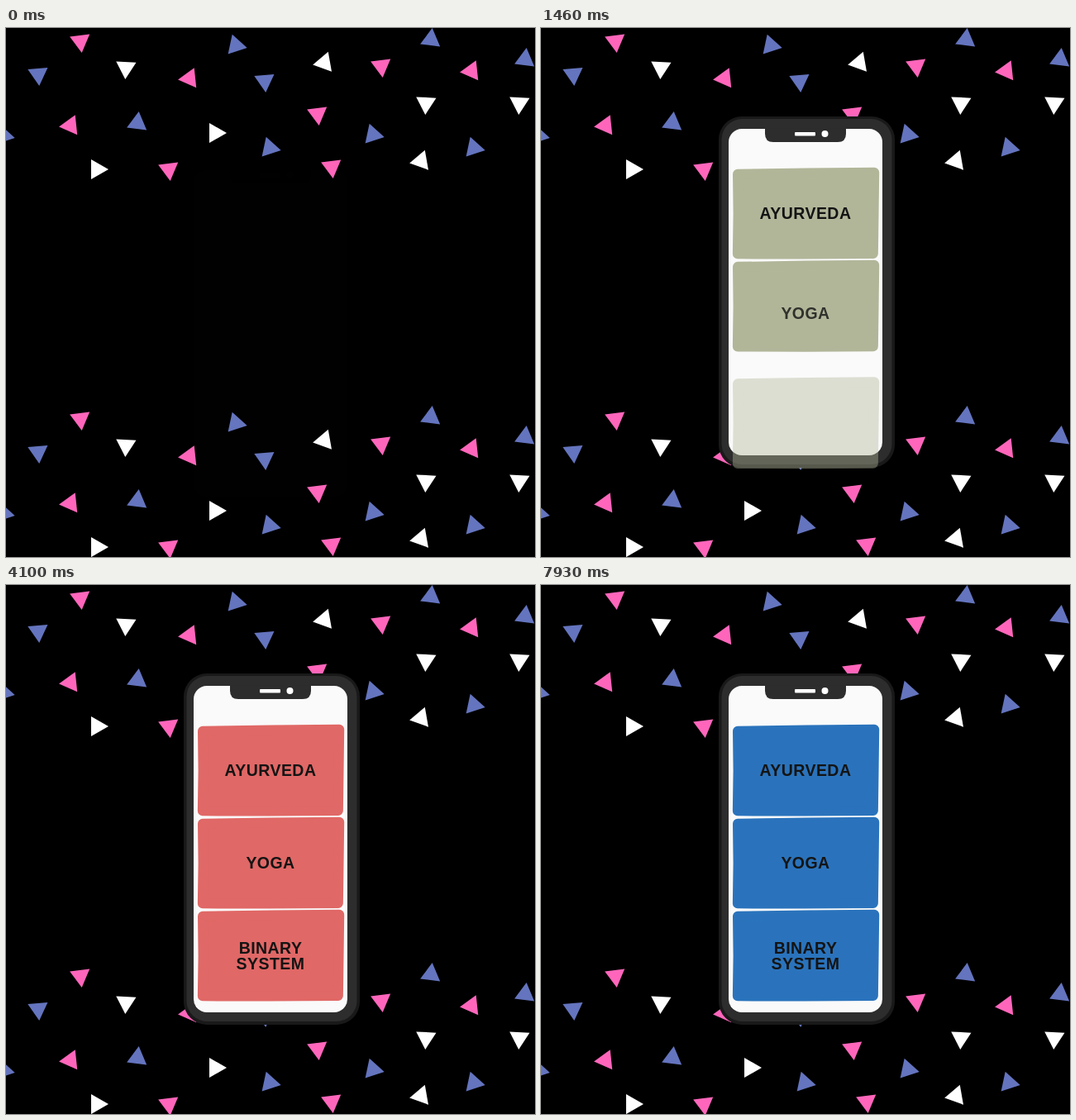
Write an HTML page that moves like this. It is 640 px wide and 640 px high and loops after 7.99 s.

```html
<!DOCTYPE html>
<html lang="en">
<head>
<meta charset="utf-8">
<title>Phone menu</title>
<style>
  html, body { margin: 0; width: 100%; height: 100%; overflow: hidden; background: #000; }
  svg { display: block; width: 100%; height: 100%; }
  text { font: bold 19.5px "Liberation Sans", Arial, sans-serif; letter-spacing: .45px; text-anchor: middle; fill: #141414; }
</style>
</head>
<body>
<svg viewBox="0 0 640 640">
  <rect width="640" height="640"/>
  <g id="confetti"></g>
  <g id="phone">
    <rect x="215" y="107" width="213" height="425" rx="28" fill="#191919"/>
    <rect x="218.5" y="110" width="206" height="418" rx="25" fill="#2d2d2d"/>
    <rect x="227" y="122" width="186" height="395" rx="16" fill="#fafafa"/>
    <path d="M271 121.5H369V128Q369 138 359 138H281Q271 138 271 128Z" fill="#2d2d2d"/>
    <rect x="307" y="126" width="25" height="4.5" rx="1" fill="#fff"/>
    <circle cx="343.5" cy="128" r="4" fill="#fff"/>
  </g>
  <g id="menu"></g>
</svg>
<script>
const LOOP = 7990, STAGGER = 500, ROW = 112, RISE = 50;
const PINK = '#ff66bb', WHITE = '#fff', VIOLET = '#6474be';
const COLORS = ['#f2b250', '#92b8bb', '#e06866', '#a6f2cd', '#2a73bc'];
const COLOR_TIME = 2000;
const NS = 'http://www.w3.org/2000/svg';
const $ = id => document.getElementById(id);

function add(parent, tag, attrs) {
  const el = document.createElementNS(NS, tag);
  for (const k in attrs) el.setAttribute(k, attrs[k]);
  return parent.appendChild(el);
}

const clamp = v => Math.max(0, Math.min(1, v));
const easeOut = p => 1 - (1 - clamp(p)) ** 2;
const smooth = p => (p = clamp(p)) * p * (3 - 2 * p);

// Confetti: a band of triangles, repeated lower down
function triangle(x, y, deg) {
  return [0, 120, 240].map(d => {
    const a = (deg + d) * Math.PI / 180;
    return `${x + 14 * Math.cos(a)},${y + 14 * Math.sin(a)}`;
  }).join(' ');
}

function scatter(fill, deg, ...spots) {
  for (const [x, y] of spots)
    for (const dy of [0, 457])
      add($('confetti'), 'polygon', { points: triangle(x, y + dy, deg), fill });
}

scatter(PINK, 54, [222, 61], [563, 52], [78, 118]);
scatter(PINK, 83, [90, 16], [454, 46], [377, 104], [197, 171], [394, 168]);
scatter(WHITE, 0, [253, 127], [110, 171]);
scatter(WHITE, 50, [385, 42], [502, 161]);
scatter(WHITE, 93, [145, 48], [508, 91], [621, 91]);
scatter(VIOLET, 12, [278, 21], [444, 129], [-3, 130], [319, 145], [566, 145]);
scatter(VIOLET, 37, [514, 14], [628, 38], [159, 115]);
scatter(VIOLET, 85, [39, 56], [313, 64]);

// A card with slightly uneven edges; the round stroke softens its corners
function outline(pose) {
  const nudge = n => Math.sin(n * 7.3 + pose * 2.1);
  const corners = [[238, 176.5], [402.5, 175.5], [402.5, 272.5], [238, 273]];
  return corners.flatMap(([x, y], i) => {
    const [nx, ny] = corners[(i + 1) % 4];
    return [[x, y], [(x + nx) / 2, (y + ny) / 2]];
  }).map(([x, y], i) => `${x + nudge(i) * .8},${y + nudge(i + 9) * .8}`).join(' ');
}

const cards = [['AYURVEDA'], ['YOGA'], ['BINARY', 'SYSTEM']].map((lines, i) => {
  const shape = add($('menu'), 'polygon', { 'stroke-width': 12, 'stroke-linejoin': 'round' });
  const label = add($('menu'), 'g');
  lines.forEach((line, n) => {
    const y = 231 + (n - (lines.length - 1) / 2) * 19 + i * ROW;
    add(label, 'text', { x: 320, y }).textContent = line;
  });
  return { shape, label };
});

const rgb = hex => [1, 3, 5].map(i => parseInt(hex.slice(i, i + 2), 16));

// Each colour holds, then blends into the next
function colorAt(t) {
  const i = Math.min(Math.floor(t / COLOR_TIME), COLORS.length - 2);
  const p = smooth((t / COLOR_TIME - i - .45) / .45);
  const a = rgb(COLORS[i]), b = rgb(COLORS[i + 1]);
  return `rgb(${a.map((v, c) => Math.round(v + (b[c] - v) * p))})`;
}

function enter(el, t, start, dur, y = 0) {
  const p = easeOut((t - start) / dur);
  el.setAttribute('transform', `translate(0 ${y + RISE * (1 - p)})`);
  el.style.opacity = p;
}

function draw(t) {
  const color = colorAt(t), points = outline(Math.floor(t / 180) % 2);
  enter($('phone'), t, 0, 800);
  cards.forEach(({ shape, label }, i) => {
    const local = t - i * STAGGER;
    enter(shape, local, 300, 700, i * ROW);
    enter(label, local, 560, 700);
    shape.setAttribute('points', points);
    shape.setAttribute('fill', color);
    shape.setAttribute('stroke', color);
  });
}

const begin = performance.now();
function tick() {
  draw((performance.now() - begin) % LOOP);
  requestAnimationFrame(tick);
}
tick();
</script>
</body>
</html>
```
